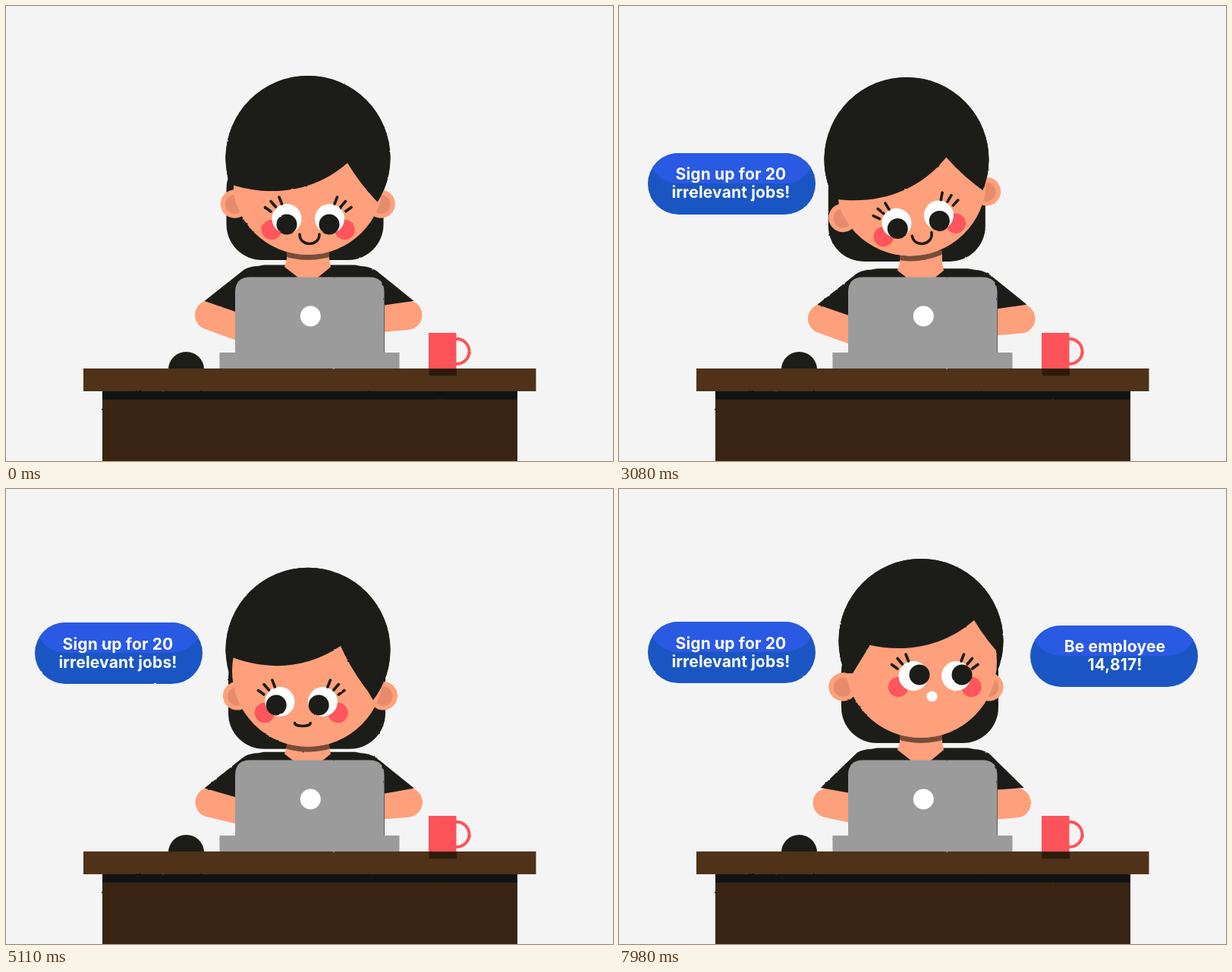
An HTML page that plays this animation: 800 px wide and 600 px high, repeating every 8 s.

```html
<!DOCTYPE html>
<html lang="en">
<head>
<meta charset="utf-8">
<title>Typing at the desk</title>
<style>
  html, body { margin: 0; width: 100%; height: 100%; overflow: hidden; background: #f4f4f4; }
  svg { display: block; width: 100vw; height: 100vh; }
  .hair { fill: #1c1d18; }
  .skin { fill: #fea07b; }
  .inner { fill: #e68c6d; }
  .red { fill: #ff555c; }
  .white { fill: #fff; }
  .arm { stroke: #fea07b; stroke-width: 39; stroke-linecap: round; }
  .line { fill: none; stroke: #1c1d18; stroke-width: 3.6; stroke-linecap: round; }
  text { font: 700 21px Inter, "Open Sans", sans-serif; letter-spacing: 0.15px; fill: #fff; text-anchor: middle; }
</style>
</head>
<body>
<svg viewBox="0 0 800 600" xmlns="http://www.w3.org/2000/svg">
  <defs>
    <filter id="rough" filterUnits="userSpaceOnUse" x="-10" y="-10" width="820" height="630" color-interpolation-filters="sRGB">
      <feTurbulence type="fractalNoise" baseFrequency="0.2" numOctaves="1" seed="4"/>
      <feColorMatrix values="1 0 0 0 0  0 1 0 0 0  0 0 1 0 0  0 0 0 0 1" result="noise"/>
      <feDisplacementMap in="SourceGraphic" in2="noise" scale="2" xChannelSelector="R" yChannelSelector="G"/>
    </filter>
    <path id="neckShape" d="M370 318H426V334L428 344L411 358H385L367 344L370 334Z"/>
    <circle id="skull" cx="398" cy="200.5" r="108.5"/>
    <circle id="face" cx="398" cy="228" r="100"/>
    <rect id="pill" x="-110.5" y="-40.5" width="221" height="81" rx="40.5"/>
    <clipPath id="inNeck"><use href="#neckShape"/></clipPath>
    <clipPath id="inSkull"><use href="#skull"/></clipPath>
    <clipPath id="lowFace"><path d="M270 246H530V350H270Z"/></clipPath>
    <clipPath id="inPill"><use href="#pill"/></clipPath>
    <g id="bubble">
      <use href="#pill" fill="#1a56c3"/>
      <g clip-path="url(#inPill)"><use href="#pill" y="-41" fill="#2a59e3"/></g>
    </g>
    <g id="ear">
      <circle class="skin" cy="261" r="18.8"/>
      <circle class="inner" cy="261.5" r="12.5"/>
    </g>
    <g id="eyeSide">
      <circle class="red" cx="-48" cy="295" r="13.2"/>
      <circle class="white" cx="-28" cy="280.5" r="19.5"/>
      <path class="line" d="M-56.500 265.500L-49 271M-49 257.500L-42.500 265M-38 252L-34.500 261"/>
    </g>
  </defs>

  <g filter="url(#rough)">
    <path fill="#f4f4f4" d="M-10-10H810V620H-10Z"/>

    <rect id="backHair" class="hair" x="293" y="190" width="207" height="141" rx="47"/>

    <g id="body">
      <line id="armL" class="arm"/>
      <line id="armR" class="arm"/>
      <path id="shirt" class="hair"/>
      <use href="#neckShape" class="skin"/>
      <g clip-path="url(#inNeck)"><circle id="chinShade" cx="398" cy="235" r="100" fill="#784c39"/></g>
    </g>

    <g id="head">
      <use href="#skull" class="hair"/>
      <use href="#face" class="skin"/>
      <g clip-path="url(#inSkull)">
        <path id="sideHair" class="hair" d="M300 241L278 277H240V150L300 200Z"/>
      </g>
      <g id="ears">
        <use href="#ear" x="301.5"/>
        <use href="#ear" x="494"/>
      </g>
      <g clip-path="url(#lowFace)"><use href="#face" class="skin"/></g>
      <g id="features">
        <use href="#eyeSide" transform="translate(398 0)"/>
        <use href="#eyeSide" transform="translate(398.500 0) scale(-1 1)"/>
        <g id="pupils" class="hair">
          <circle cx="370" cy="280" r="13.5"/>
          <circle cx="426" cy="280" r="13.5"/>
        </g>
        <path id="smile" class="line"/>
        <circle id="mouth" class="white" cx="394.5" cy="307.5"/>
      </g>
      <g clip-path="url(#inSkull)">
        <path id="fringe" class="hair" d="M250 215C320 255 395 255 450 207Q468 237 493 262L530 311V40H220V215Z"/>
      </g>
    </g>

    <path fill="#9b9b9b" d="M302 457V377.500Q302 357.500 322 357.500H478.500Q498.500 357.500 498.500 377.500V457H518.500V479H281.500V457Z"/>
    <circle class="white" cx="401.300" cy="409" r="13.500"/>
    <path class="hair" d="M214 479A23.500 23 0 0 1 261 479Z"/>
    <circle cx="594" cy="455.500" r="16.500" fill="none" stroke="#fd5359" stroke-width="4"/>
    <path fill="#fd5359" d="M557 431H593.500V479H557Z"/>
    <path fill="#3a2414" d="M127 500H674V620H127Z"/>
    <path fill="#111315" d="M127 500H674V519H127Z"/>
    <path fill="#4f3218" d="M102 478H698.500V508H102Z"/>
    <path fill="#2f1b0c" d="M557.500 478.500H594V487.500H557.500Z"/>

    <g id="bubbleL">
      <use href="#bubble"/>
      <text x="-1" y="-5">Sign up for 20</text>
      <text x="-1" y="19">irrelevant jobs!</text>
    </g>
    <g id="bubbleR">
      <use href="#bubble"/>
      <text x="1" y="-5">Be employee</text>
      <text x="1" y="19">14,817!</text>
    </g>
  </g>
</svg>
<script>
const LOOP = 8000, STEP = 70, TYPING = 513;
const DIPS = [3290, 5090, 5915, 7070];

const $ = id => document.getElementById(id);
const place = (id, transform) => $(id).setAttribute('transform', transform);
const clamp = v => Math.min(1, Math.max(0, v));

// Smooth 0 to 1 between two times.
function ease(t, start, end) {
  const u = clamp((t - start) / (end - start));
  return u * u * (3 - 2 * u);
}

// Smooth rise and fall around one time.
const bell = (t, peak, reach) => Math.cos(clamp(Math.abs(t - peak) / reach) * Math.PI / 2) ** 2;
const dip = t => Math.max(...DIPS.map(peak => bell(t, peak, 230)));

function poseAt(t) {
  const left = ease(t, 3150, 3500) - ease(t, 4895, 5345);
  const right = ease(t, 6930, 7280);
  const away = left + right;
  const nudge = bell(t, 1190, 200);
  return {
    left, right,
    tilt: -10.4 * (ease(t, 900, 1190) - ease(t, 3120, 3430)),
    lookX: 18 * right - 17 * left,
    lookY: -22 * left - 34 * right - 2.5 * nudge,
    pupilX: 8 * right - 6.5 * Math.sqrt(left),
    pupilY: 8 - 10.5 * left ** 2 - 9 * right ** 2,
    smile: clamp(1 - 1.3 * away),
    mouth: clamp((away - 0.75) * 4),
    headY: 12 * dip(t),
    bodyY: 10 * dip(t + 90),
    fringe: 7 * dip(t) + 3 * nudge,
    settle: Math.exp(-t / 200),
    pull: ease(t, 7350, 7800)
  };
}

function drawArm(id, x, y, degrees, side) {
  const a = degrees * Math.PI / 180;
  const ends = { x1: x, y1: y, x2: x + side * 75 * Math.cos(a), y2: y + 75 * Math.sin(a) };
  for (const name in ends) $(id).setAttribute(name, ends[name]);
}

function drawBubble(id, x, age) {
  const pop = 1 - (1 - clamp(age / 210)) ** 3;
  const rise = (0.535 * Math.max(0, 4.25 - age / 1000)) ** 4;
  $(id).style.display = age > 0 ? '' : 'none';
  place(id, `translate(${x} ${215.5 + rise}) scale(${pop})`);
}

function drawBody(p, t) {
  const beat = Math.cos(t / TYPING * 2 * Math.PI) * (1 - 0.8 * p.left - 1.5 * p.right);
  const angle = 12.5 - 6.5 * p.left - 4 * p.right;
  const inward = 6 * p.pull, sag = 1 - beat;
  const elbowY = 407.5 + 0.8 * sag + inward;
  place('body', `translate(0 ${p.bodyY})`);
  drawArm('armL', 268.5 + sag + inward, elbowY, angle + 7.5 * beat, 1);
  drawArm('armR', 529 + sag - inward, elbowY, angle - 7.5 * beat, -1);
  const cuffY = 389 + 0.6 * sag + 0.8 * inward;
  $('shirt').setAttribute('d',
    `M${261.5 + 0.7 * inward} ${cuffY}L314 347.5Q322 343 332 343L340 341.5H460L468 343Q478 343 488 349` +
    `L${537.5 + 0.7 * sag - 0.7 * inward} ${cuffY}L499 ${398.5 - 4 * beat}V480H302V${398.5 + 4.5 * beat}Z`);
}

function drawHead(p) {
  const turn = `rotate(${p.tilt} 398 306)`;
  const look = `translate(${p.lookX} ${p.lookY})`;
  const hairX = 1.65 * p.tilt - 2.5 * p.settle;
  const hairY = p.headY - 0.55 * p.tilt + 4 * (p.right + p.settle);
  place('head', `translate(0 ${p.headY}) ${turn}`);
  place('chinShade', `translate(0 ${p.headY - p.bodyY}) ${turn}`);
  place('backHair', `translate(${hairX} ${hairY})`);
  place('sideHair', `translate(${1.67 * p.lookX} ${p.lookY})`);
  place('ears', `translate(${-0.35 * p.lookX} 0)`);
  place('features', look);
  place('pupils', `translate(${p.pupilX} ${p.pupilY})`);
  place('fringe', `${look} rotate(${p.fringe} 450 207)`);

  const half = 13 * (0.7 + 0.3 * p.smile), top = 301 + 11 * (1 - p.smile), low = top + 16.7 * p.smile;
  $('smile').style.display = p.smile > 0 ? '' : 'none';
  $('smile').setAttribute('d', `M${400 - half} ${top}C${400 - half} ${low} ${400 + half} ${low} ${400 + half} ${top}`);
  $('mouth').setAttribute('r', 7 * p.mouth);
}

function draw(now) {
  const t = Math.floor(now % LOOP / STEP) * STEP;
  const pose = poseAt(t);
  drawBody(pose, t);
  drawHead(pose);
  drawBubble('bubbleL', 148.5, t - 2730);
  drawBubble('bubbleR', 652.5, t - 6510);
}

function tick() {
  draw(performance.now());
  requestAnimationFrame(tick);
}
tick();
</script>
</body>
</html>
```
